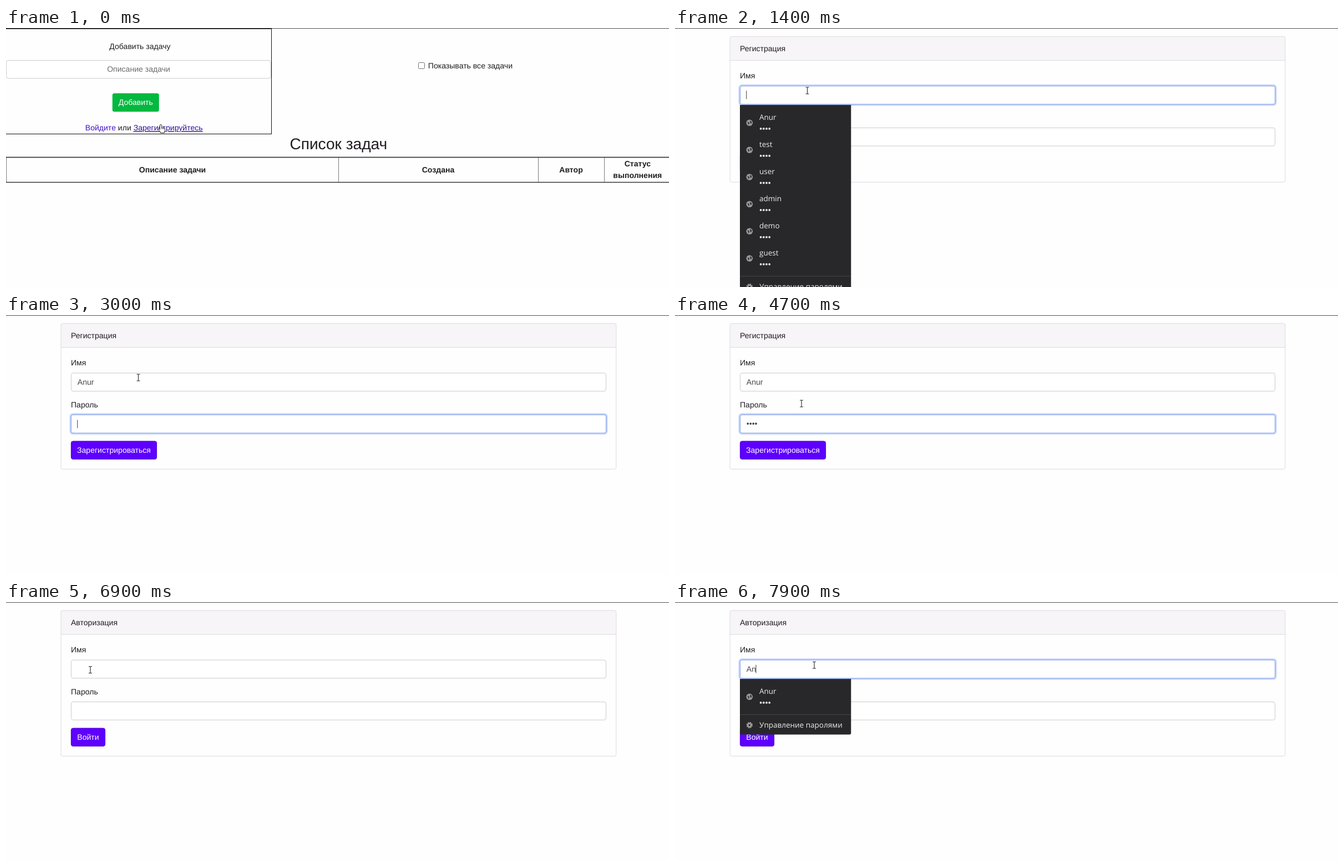
Write an HTML page that moves like this. It is 1195 by 468 pixels and loops after 8 s.

```html
<!DOCTYPE html>
<html lang="ru">
<head>
<meta charset="utf-8">
<title>Список задач</title>
<style>
  html, body { margin: 0; width: 100%; height: 100%; overflow: hidden; background: #fefefe; }
  svg { display: block; width: 1195px; height: 468px; }
  text { font-family: "Liberation Sans", Arial, sans-serif; font-size: 14.05px; fill: #211d22;
         text-rendering: geometricPrecision; white-space: pre; }
  .mid { text-anchor: middle; }
  .bold { font-weight: bold; }
  .white { fill: #fff; }
  .value { fill: #4b464e; }
  .menu { font-family: "Open Sans", "Noto Sans", sans-serif; font-size: 13.5px; fill: #ececec; }
</style>
</head>
<body>
<svg id="stage" viewBox="0 0 1195 468"></svg>
<script>
const stage = document.getElementById('stage');
const LOOP = 8000, FONT = 14.05, LEFT = 128.8;
const USER = 'Anur';
const SAVED = [USER, 'test', 'user', 'admin', 'demo', 'guest'];
const ADVANCE = [0, .667, 1.223, 1.779, 2.112];

// Each track is [start, value]; a value holds until the next start.
const tracks = {
  typed: [[0, 0], [1800, 1], [2200, 2], [2300, 3], [2500, 4], [5700, 0], [7700, 1], [7900, 2]],
  dots: [[0, 0], [3200, 1], [3600, 2], [3800, 3], [4500, 4], [5700, 0]],
  nameRing: [[0, 0], [1300, .5], [1400, 1], [2700, 0], [7000, .5], [7100, 1]],
  passRing: [[0, 0], [2700, 1], [5600, .4], [5700, 0]],
  caret: [[0, ''], [1300, 'name'], [2700, 'pass'], [4700, ''], [7000, 'name']],
  rows: [[0, 0], [1300, 6], [1900, 1], [3000, 0], [7000, 6], [7700, 1]],
  button: [[0, '#5e00fe'], [5000, '#5400ea'], [5100, '#4a00d6'], [5700, '#5e00fe']],
  cursor: [
    [0, ['hand', 279, 174.5]], [1100, ['beam', 238.5, 113]],
    [4700, ['beam', 228, 160]], [4800, ['beam', 212, 211]],
    [5000, ['hand', 202, 236]], [5100, ['hand', 200, 240]],
    [5300, ['hand', 192.5, 247.5]], [6300, ['arrow', 202, 242]],
    [6500, ['beam', 190, 206]], [6600, ['arrow', 172, 171]],
    [6700, ['beam', 160, 135]], [6800, ['beam', 153, 125]],
    [6900, ['beam', 152, 122.5]], [7300, ['beam', 251, 114]]
  ]
};

const at = (track, t) => track.reduce((v, [start, next]) => t >= start ? next : v, null);
const text = (x, y, str, cls = '', attrs = '') => `<text x="${x}" y="${y}" class="${cls}" ${attrs}>${str}</text>`;
const rect = (x, y, w, h, attrs) => `<rect x="${x}" y="${y}" width="${w}" height="${h}" ${attrs}/>`;
const line = (d, color, w = 1) => `<path d="${d}" fill="none" stroke="${color}" stroke-width="${w}"/>`;
const circle = (x, y, r, attrs) => `<circle cx="${x}" cy="${y}" r="${r}" ${attrs}/>`;

function taskPage() {
  return rect(-.5, 1.5, 479, 190, 'fill="none" stroke="#111"')
    + text(241.5, 38, 'Добавить задачу', 'mid')
    + rect(.5, 58.5, 477, 32.5, 'rx="3.5" fill="#fff" stroke="#cbcbcd"')
    + text(239, 79, 'Описание задачи', 'mid', 'style="fill:#6e6a70"')
    + rect(191.8, 118, 84, 33.2, 'rx="3.5" fill="#02b83f"')
    + text(233.8, 139, 'Добавить', 'mid white')
    + text(142.8, 185.3, '<tspan fill="#4312cc">Войдите</tspan> или '
      + '<tspan fill="#32109a" text-decoration="underline">Зарегистрируйтесь</tspan>')
    + rect(743.5, 62.5, 11, 11, 'rx="2" fill="#fff" stroke="#6f6f73"')
    + text(760.8, 73, 'Показывать все задачи')
    + text(599.3, 218.5, 'Список задач', 'mid', 'style="font-size:28.1px"')
    + line('M.5 234V279M599.5 234V279M959.5 234V279M1078.5 234V279', '#7b7b7d')
    + line('M0 233.6H1195M0 278.8H1195', '#3c3c3e', 1.6)
    + text(300, 261, 'Описание задачи', 'mid bold')
    + text(779, 261, 'Создана', 'mid bold')
    + text(1018.5, 261, 'Автор', 'mid bold')
    + text(1138.3, 250, 'Статус', 'mid bold')
    + text(1138.3, 271.3, 'выполнения', 'mid bold');
}

function field(y, ring, value) {
  const glow = ring ? rect(115.9, y - 1.4, 967.2, 35.6,
    `rx="4.5" fill="none" stroke="#c3d3fb" stroke-width="2.8" opacity="${ring}"`) : '';
  return glow
    + rect(117.5, y, 964, 32.8, `rx="3.5" fill="#fff" stroke="${ring ? '#829fe6' : '#cbcbcf'}"`)
    + text(LEFT, y + 20.8, value, 'value');
}

function menu(rows) {
  const split = 155.5 + rows * 49;
  let out = `<path d="M117 139H317.3V${split + 32}q0 3-3 3H120q-3 0-3-3z" fill="#28282a"/>`;
  SAVED.slice(0, rows).forEach((name, i) => {
    const y = 171.3 + i * 49;
    out += circle(134.3, y, 5.8, 'fill="#99999b"')
      + `<path d="M130.5 ${y - 2}l3 1.2 .6 2.3-1.6 2.2zM135 ${y - 4}l3.4 2-.8 3.8-2-.8z" fill="#353537"/>`
      + text(152, y - 5.3, name, 'menu');
    for (let k = 0; k < 4; k++) out += circle(154.6 + k * 5.2, y + 10.6, 1.9, 'fill="#ececec"');
  });
  const y = split + 18;
  return out + line(`M117 ${split - 1}H317`, '#454547')
    + circle(134.3, y, 4.7, 'fill="none" stroke="#a0a0a2" stroke-width="2" stroke-dasharray="2.2 1.49"')
    + circle(134.3, y, 3, 'fill="none" stroke="#a0a0a2" stroke-width="2.4"')
    + text(152, y + 4.8, 'Управление паролями', 'menu');
}

function formPage(t, s) {
  const login = t >= 5700;
  const w = login ? 62 : 155;
  let out = rect(99, 15.3, 1000.8, 263.3, 'rx="3.5" fill="#fefefe"')
    + `<path d="M99 58V18.8q0-3.5 3.5-3.5H1096.3q3.5 0 3.5 3.5V58z" fill="#f7f5f8"/>`
    + line('M99 58.5H1100', '#dcdade')
    + rect(99, 15.3, 1000.8, 263.3, 'rx="3.5" fill="none" stroke="#dcdade"')
    + text(117, 41.5, login ? 'Авторизация' : 'Регистрация')
    + text(117, 91.3, 'Имя')
    + text(117, 166.8, 'Пароль')
    + field(104.9, s.nameRing, USER.slice(0, s.typed))
    + field(180.4, s.passRing, '•'.repeat(s.dots))
    + rect(117.4, 228, w - .8, 32.6, `rx="3.5" fill="${s.button}" stroke="#4c00d2"`)
    + text(117 + w / 2, 248.8, login ? 'Войти' : 'Зарегистрироваться', 'mid white');
  if (s.caret) {
    const name = s.caret === 'name';
    const x = LEFT + FONT * (name ? ADVANCE[s.typed] : s.dots * .35);
    const y = name ? 113.5 : 189.5;
    out += line(`M${x} ${y}v15`, '#3a363c');
  }
  if (s.rows) {
    const closing = t >= 2700 && t < 3000;
    out += closing
      ? `<g opacity=".15" transform="translate(217 195) scale(.97) translate(-217 -189)">${menu(1)}</g>`
      : menu(s.rows);
  }
  return out;
}

function pointer([kind, x, y]) {
  const shapes = {
    hand: `<path d="M-1.6 1.4a1.6 1.4 0 0 1 3.2 0V6q1-.8 2.2 0q1-.7 2 .2q1.4-.4 1.8.8V10q0 2-1.2 3.2V15H-.6V13.6L-4.4 9.2q-.4-1.5 1-1.4L-1.6 9z"
      fill="#fff" stroke="#262628" stroke-linejoin="round"/>` + line('M1.6 6V8.4M3.8 6V8.4M5.8 6.4V8.6', '#262628', .7),
    beam: line('M-3 -6H-.8L0 -5.4L.8 -6H3M0 -5.4V5.4M-3 6H-.8L0 5.4L.8 6H3', '#fff', 2.4)
      + line('M-3 -6H-.8L0 -5.4L.8 -6H3M0 -5.4V5.4M-3 6H-.8L0 5.4L.8 6H3', '#252527', 1.1),
    arrow: '<path d="M0 0V14L3.3 11L5.4 15.6L7.6 14.6L5.6 10.2H10z" fill="#222" stroke="#fff" stroke-width=".8"/>'
  };
  return `<g transform="translate(${x} ${y})">${shapes[kind]}</g>`;
}

function render(t) {
  const s = {};
  for (const key in tracks) s[key] = at(tracks[key], t);
  stage.innerHTML = rect(0, 0, 1195, 468, 'fill="#fefefe"')
    + (t < 600 ? taskPage() : formPage(t, s))
    + line('M0 .5H1195', '#4a4a4c')
    + pointer(s.cursor);
}

const begin = performance.now();
let shown = -1;
function tick() {
  const t = Math.floor((performance.now() - begin) % LOOP / 100) * 100;
  if (t !== shown) render(shown = t);
  requestAnimationFrame(tick);
}
tick();
</script>
</body>
</html>
```
